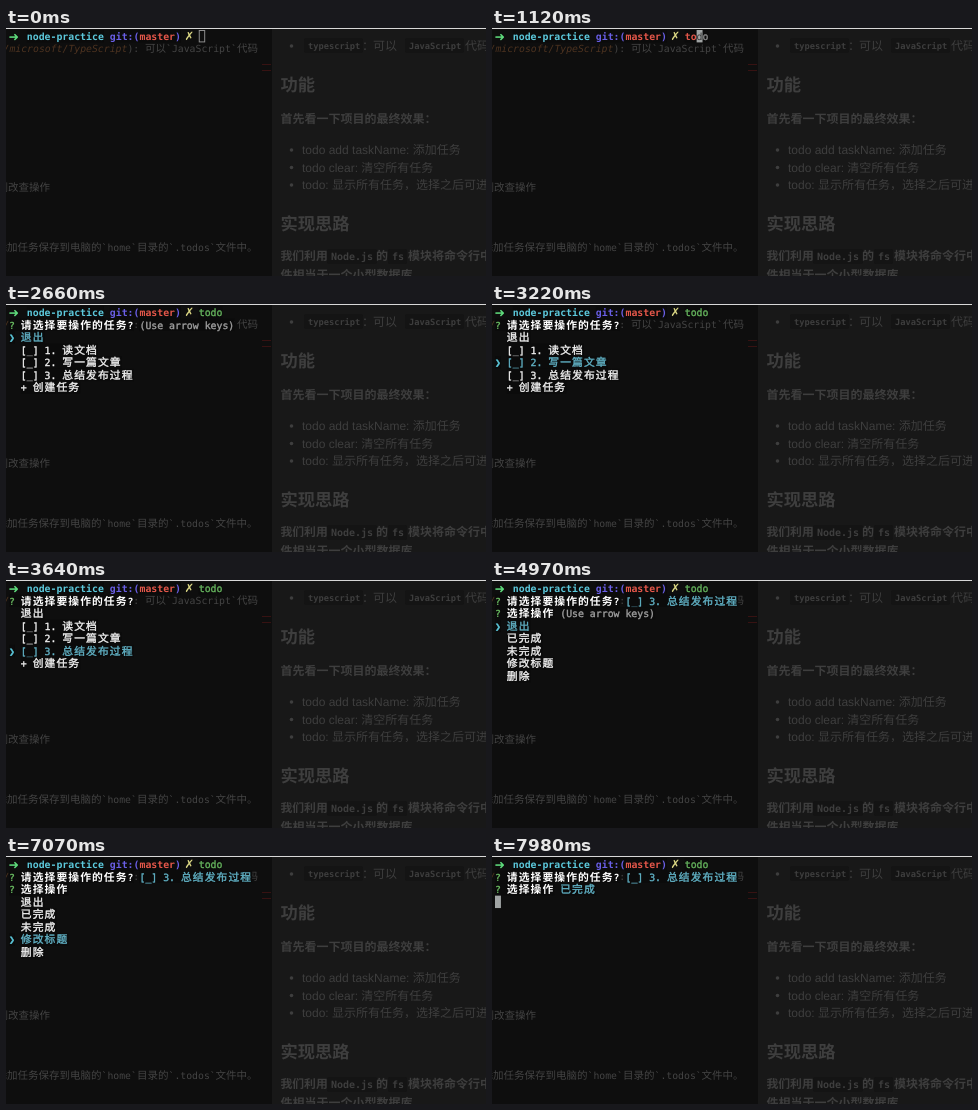
These frames come from a looping animation (480x248 px, 8000 ms). An HTML page:

```html
<!DOCTYPE html>
<html lang="zh">
<head>
<meta charset="utf-8">
<style>
  html, body { margin: 0; width: 100%; height: 100%; overflow: hidden; background: #0e0e0e; }
  svg { display: block; width: 480px; height: 248px; text-rendering: geometricPrecision; }
  text { white-space: pre; }
  .mono { font-family: "DejaVu Sans Mono", "Noto Sans CJK SC", "Noto Sans CJK", monospace; }
  .sans { font-family: "Liberation Sans", "Noto Sans CJK SC", "Noto Sans CJK", sans-serif; }
  .symbol { font-family: "DejaVu Sans", sans-serif; font-weight: 700; }
</style>
</head>
<body>
<svg viewBox="0 0 480 248">
  <rect width="480" height="248" fill="#0e0e0e"/>
  <rect x="266" width="214" height="248" fill="#181818"/>
  <path d="M256 36.5h9M256 42.5h9" stroke="#371212"/>
  <g id="page"></g>
  <g id="terminal"></g>
  <rect width="480" height="1" fill="#d8d8d8"/>
</svg>
<script>
const LOOP = 8000, CELL = 5.93, LEFT = 3, ROW = 12.55, FONT = 9.85;
const CYAN = '#62b4c8', BRIGHT_CYAN = '#5cc9dc', GREEN = '#66b55e', WHITE = '#f4f4f4';
const RED = '#e4574a', VIOLET = '#6a5fe6', GREY = '#a0a0a0';
const page = document.getElementById('page');
const terminal = document.getElementById('terminal');

const label = (x, y, text, size, fill, attrs = 'class="sans"') =>
  `<text x="${x}" y="${y}" font-size="${size}" fill="${fill}" ${attrs}>${text}</text>`;

function drawPage() {
  const dim = '#444', soft = '#3e3e3e';
  const mono = 'class="mono"', bold = 'class="sans" font-weight="700"';
  const bullet = y => `<circle cx="285.5" cy="${y}" r="1.8" fill="${soft}"/>`;
  const item = (y, text) => bullet(y) + label(296, y + 4, text, 12, soft);
  const chip = (x, y, width, text, size) =>
    `<rect x="${x - 4}" y="${y - 11}" width="${width + 8}" height="15" rx="2" fill="#141414"/>` +
    label(x, y, text, size, soft, 'class="mono" font-weight="700"');
  const source = (x, y, text) => label(x, y, text, /`/.test(text) ? 9.8 : 10.5, dim, mono);

  page.innerHTML = [
    label(-2.5, 24, '/microsoft/TypeScript', 9.8, '#4d3320', mono + ' font-style="italic"'),
    label(121.4, 24, '):', 9.8, dim, mono),
    source(139, 24, '可以'),
    source(160, 24, '`JavaScript`'),
    source(231, 24, '代码'),
    source(-8.5, 163, '删改查操作'),
    source(-9.5, 223, '添加任务保存到电脑的'),
    source(95.5, 223, '`home`'),
    source(131, 223, '目录的'),
    source(162.5, 223, '`.todos`'),
    source(209.5, 223, '文件中。'),

    bullet(18),
    chip(302, 21, 51, 'typescript', 8.7),
    label(356, 22, '：', 12, soft),
    label(367, 22, '可以', 12, soft),
    chip(403, 21, 51, 'JavaScript', 8.7),
    label(459, 22, '代码', 12, soft),
    label(274.5, 62.5, '功能', 17.3, soft, bold),
    label(274.5, 95, '首先看一下项目的最终效果：', 12, soft, bold),
    item(122, 'todo add taskName: 添加任务'),
    item(139.5, 'todo clear: 清空所有任务'),
    item(157, 'todo: 显示所有任务，选择之后可进'),
    label(274.5, 201.5, '实现思路', 17.3, soft, bold),
    label(274.5, 232, '我们利用', 11.8, soft, bold),
    chip(325, 232, 42, 'Node.js', 10),
    label(370, 232, '的', 12, soft, bold),
    chip(386, 232, 11, 'fs', 10),
    label(402, 232, '模块将命令行中', 12, soft, bold),
    label(274.5, 251, '件相当于一个小型数据库', 12, soft, bold)
  ].join('');
}

// Prints one run on the character grid; Chinese characters take two cells.
function print(row, col, text, fill, bold = false) {
  const top = 2 + row * ROW, start = LEFT + col * CELL;
  const weight = bold ? 'font-weight="700"' : `stroke="${fill}" stroke-width=".35"`;
  let x = start, out = '';
  for (const part of text.match(/[一-龥]+|[^一-龥]+/g)) {
    const wide = /[一-龥]/.test(part);
    out += label(x, top + 10.1, part, wide ? 10.8 : FONT, fill,
      `class="mono" ${weight} ${wide ? 'letter-spacing="1.06"' : ''}`);
    x += part.length * CELL * (wide ? 2 : 1);
  }
  return `<rect x="${start}" y="${top}" width="${x - start}" height="${ROW}" fill="#0b0b0b"/>` + out;
}

function cursor(row, col, hollow) {
  const paint = hollow ? 'fill="none" stroke="#8c8c8c"' : 'fill="#a0a4a4"';
  const inset = hollow ? 0.5 : 0;
  return `<rect x="${LEFT + col * CELL + inset}" y="${2 + row * ROW + inset}"
    width="${CELL - inset}" height="${12.4 - 2 * inset}" ${paint}/>`;
}

const prompt = () =>
  label(2.5, 12.7, '➜', 12.5, '#5fdc7c', 'class="symbol"') +
  print(0, 3, 'node-practice', BRIGHT_CYAN, true) +
  print(0, 17, 'git:(', VIOLET, true) +
  print(0, 22, 'master', RED, true) +
  print(0, 28, ')', VIOLET, true) +
  label(178.5, 12.4, '✗', 11.5, '#dcd884', 'class="symbol"');

function typing(count) {
  const word = 'todo', done = count === word.length;
  let out = prompt();
  if (count) out += print(0, 32, word.slice(0, count), done ? GREEN : RED, !done);
  if (count && !done) out += print(0, 32 + count, word.slice(count), '#8c8c8c');
  out += cursor(0, 32 + count);
  if (count && !done) {
    out += label(LEFT + (32 + count) * CELL, 12.1, word[count], FONT, '#333', 'class="mono"');
  }
  return out;
}

const command = () => prompt() + print(0, 32, 'todo', GREEN);

const question = (row, text) => print(row, 0, '? ', GREEN, true) + print(row, 2, text, '#fff', true);

const menu = (row, items, selected) => items.map((text, i) =>
  (i === selected ? print(row + i, 0, '❯', BRIGHT_CYAN) : '') +
  print(row + i, 2, text, i === selected ? CYAN : WHITE)).join('');

const tasks = ['退出', '[_] 1. 读文档', '[_] 2. 写一篇文章', '[_] 3. 总结发布过程', '+ 创建任务'];
const actions = ['退出', '已完成', '未完成', '修改标题', '删除'];

const taskQuestion = () => command() + question(1, '请选择要操作的任务?');
const taskMenu = (selected, hint) => taskQuestion() +
  (hint ? print(1, 22, '(Use arrow keys)', GREY) : '') + menu(2, tasks, selected);

const actionQuestion = () => taskQuestion() + print(1, 22, tasks[3], CYAN) + question(2, '选择操作');
const actionMenu = (selected, hint) => actionQuestion() +
  (hint ? print(2, 11, '(Use arrow keys)', GREY) : '') + menu(3, actions, selected);

const timeline = [
  [0, () => prompt() + cursor(0, 32, true)],
  [70, () => typing(0)],
  [910, () => typing(1)],
  [1050, () => typing(2)],
  [1400, () => typing(3)],
  [1540, () => typing(4)],
  [2030, () => command() + cursor(1, 0)],
  [2310, () => taskMenu(0, true)],
  [2730, () => taskMenu(1)],
  [3150, () => taskMenu(2)],
  [3500, () => taskMenu(3)],
  [4690, () => actionMenu(0, true)],
  [5530, () => actionMenu(1)],
  [5950, () => actionMenu(2)],
  [6230, () => actionMenu(3)],
  [7140, () => actionMenu(2)],
  [7350, () => actionMenu(1)],
  [7840, () => actionQuestion() + print(2, 11, actions[1], CYAN) + cursor(3, 0)]
];

let shown = null;
function render(now) {
  const time = now % LOOP;
  const step = timeline.findLast(([start]) => start <= time);
  if (step !== shown) {
    shown = step;
    terminal.innerHTML = step[1]();
  }
}

drawPage();
const begin = performance.now();
function tick() {
  render(performance.now() - begin);
  requestAnimationFrame(tick);
}
tick();
</script>
</body>
</html>
```
